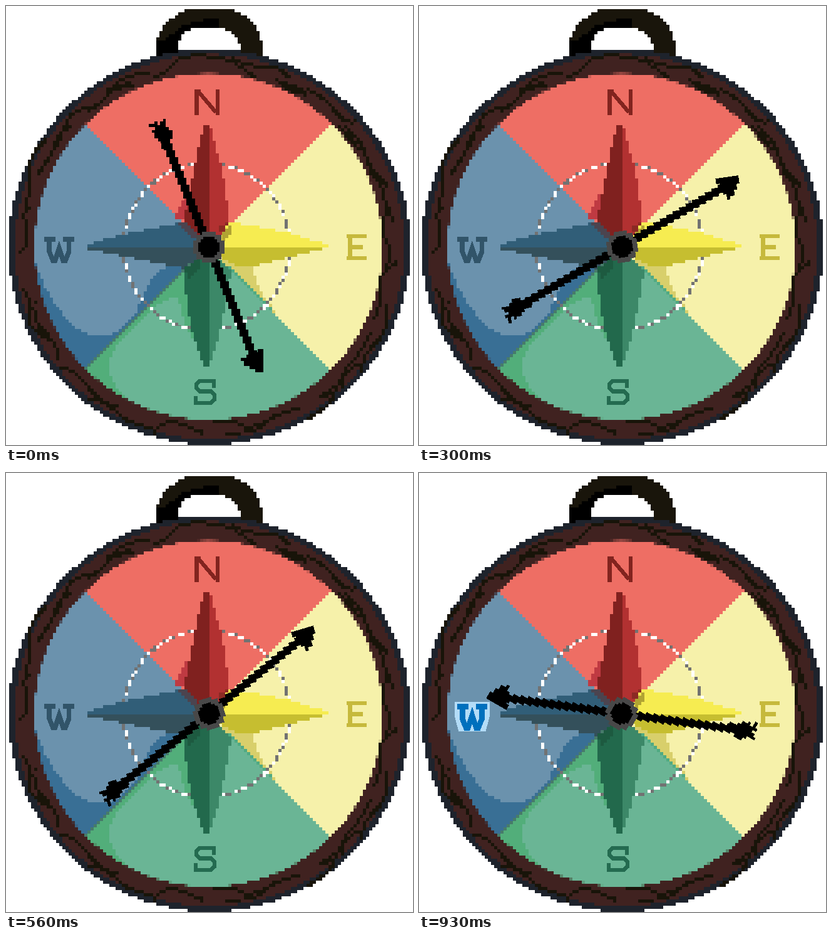
An HTML page without scripts that plays this animation: 650x700 px, repeating every 0.96 s.

```html
<!DOCTYPE html>
<html lang="en">
<head>
<meta charset="utf-8">
<title>Compass</title>
<style>
  html, body { margin: 0; width: 100%; height: 100%; overflow: hidden; background: #fff; }
  svg { display: block; width: 650px; height: 700px; shape-rendering: crispEdges; }

  @property --tick { syntax: "<number>"; inherits: false; initial-value: 0; }

  /* Quadratic ease-in-out over 21 ticks, one and two thirds turns */
  .needle {
    --u: calc(var(--tick) / 21);
    --a: min(var(--u), .5);
    --b: max(0, var(--u) - .5);
    --ease: calc(2 * var(--a) * var(--a) + 2 * var(--b) - 2 * var(--b) * var(--b));
    transform-origin: 324px 384px;
    transform: rotate(calc(-600deg * var(--ease)));
    animation: spin 960ms infinite;
  }
  @keyframes spin {
    0% { --tick: 0; }
    9.6875% { --tick: 0; animation-timing-function: steps(21); }
    82.604%, 100% { --tick: 21; }
  }

  .lit { visibility: hidden; animation: light 960ms step-end infinite; }
  @keyframes light { 0% { visibility: hidden; } 96.77%, 100% { visibility: visible; } }

  .letters { fill: none; stroke-width: 1.4; }
  .grain { fill: none; stroke: #181409; stroke-width: 4.8; }
</style>
</head>
<body>
<svg viewBox="0 0 650 700" role="img" aria-label="Compass: N E S W">
  <defs>
    <!-- One sample per 5 px cell, grown to fill the cell -->
    <filter id="pixels" filterUnits="userSpaceOnUse" x="0" y="0" width="650" height="700" color-interpolation-filters="sRGB">
      <feFlood x="2" y="2" width="1" height="1" flood-color="#000"/>
      <feOffset x="0" y="0" width="5" height="5"/>
      <feTile result="dots"/>
      <feComposite in="SourceGraphic" in2="dots" operator="in"/>
      <feMorphology operator="dilate" radius="2"/>
    </filter>
    <clipPath id="dial"><ellipse cx="323.5" cy="383.5" rx="278" ry="276"/></clipPath>
    <clipPath id="west"><path d="M321 384L0 63V705z"/></clipPath>
    <clipPath id="south"><path d="M321 384L0 705H642z"/></clipPath>

    <!-- Staircase shaft built by doubling one step -->
    <path id="s1" d="M-6.800-5.500h13.600v11h-13.600z"/>
    <g id="s2"><use href="#s1"/><use href="#s1" x="4.5" y="11"/></g>
    <g id="s4"><use href="#s2"/><use href="#s2" x="9" y="22"/></g>
    <g id="s8"><use href="#s4"/><use href="#s4" x="18" y="44"/></g>
    <g id="s16"><use href="#s8"/><use href="#s8" x="36" y="88"/></g>

    <path id="w" d="M0 .7h3.9M6.6 .7h3.9M1.8 0v5l1.3 3.2h.7l1.45-4.4 1.45 4.4h.7l1.3-3.2v-5"/>
  </defs>

  <g filter="url(#pixels)">
    <!-- Loop -->
    <path fill="#19150b" d="M241 80V52Q252 22 288 6H362Q400 20 408 55L412 85H377V72Q370 34 322 33Q284 34 277 54V80z"/>
    <path fill="#000" d="M241 80V58Q262 50 275 36Q300 20 340 22V34Q284 30 277 54V80z"/>

    <!-- Wooden rim -->
    <ellipse cx="325" cy="384" rx="321" ry="315.500" fill="#1e232c"/>
    <ellipse cx="325" cy="384" rx="311" ry="307" fill="#402220"/>
    <g class="grain">
      <path d="M236 112Q255 108 268 92T320 80T368 92T402 116"/>
      <path d="M362 82Q382 96 410 96T452 114"/>
      <path d="M130 168Q158 152 170 130T232 108"/>
      <path d="M80 226Q92 196 100 180T140 160"/>
      <path d="M50 268Q74 240 82 208L104 190"/>
      <path d="M28 322Q42 300 38 268T64 214"/>
      <path d="M22 392Q40 380 32 350T40 322"/>
      <path d="M24 448Q40 460 36 486T62 530"/>
      <path d="M46 470Q40 500 62 520T84 566"/>
      <path d="M86 576Q110 580 130 606T180 640"/>
      <path d="M132 626Q160 630 180 650T236 672"/>
      <path d="M236 682Q250 656 278 666T316 682"/>
      <path d="M330 664Q358 656 376 668T432 650"/>
      <path d="M350 680Q390 684 410 668T470 640"/>
      <path d="M478 660Q520 640 526 614T564 570"/>
      <path d="M540 612Q530 592 552 568T582 520"/>
      <path d="M568 586Q566 560 590 538T606 476"/>
      <path d="M588 500Q600 470 598 446T626 408"/>
      <path d="M606 420Q620 396 606 370T616 320"/>
      <path d="M580 262Q600 280 604 304T620 342"/>
      <path d="M540 192Q566 210 574 238T612 288"/>
      <path d="M480 134Q506 142 524 166T560 184"/>
    </g>
    <path fill="#181409" d="M428 116L474 130L484 146L446 134zM160 132L198 120L204 128L170 136zM50 506L66 518L70 536L54 526zM524 182L554 208L570 238L550 218zM492 628L526 604L516 622z"/>

    <!-- Dial -->
    <g clip-path="url(#dial)">
      <path fill="#ee6e64" d="M321 384L0 63V0H642V63z"/>
      <path fill="#f6f1aa" d="M321 384L650 55V713z"/>
      <g clip-path="url(#west)">
        <path fill="#396f95" d="M0 0H330V700H0z"/>
        <path fill="#6b92ad" d="M0 0H330V390L268 412Q238 420 228 442Q216 466 208 488Q184 526 146 527Q108 522 84 482Q60 452 48 410H0z"/>
      </g>
      <g clip-path="url(#south)">
        <path fill="#52ae7a" d="M0 380H650V700H0z"/>
        <path fill="#6ab595" d="M208 638Q158 598 166 568Q170 546 192 524L235 482Q262 462 275 468L285 505L298 530H330V384H360L440 486L650 713H208z"/>
      </g>
      <path fill="#d8cf6b" d="M345 405L392 412L404 452L434 492L425 488z"/>
      <path fill="#50aa82" d="M350 413L362 420L430 488L420 482z"/>
    </g>

    <g fill="none" stroke-width="4.2">
      <circle cx="320.5" cy="384" r="133" stroke="#727272"/>
      <circle cx="320.5" cy="384" r="133" stroke="#fff" stroke-dasharray="11 9"/>
    </g>

    <!-- Star -->
    <path fill="#bf3a42" d="M291 290V342H267z"/>
    <path fill="#80211f" d="M323 192H316L305 235L295 290L284 340L305 366L323 384z"/>
    <path fill="#b23131" d="M323 192H326L345 260L358 346L323 384z"/>
    <path fill="#f6ec51" d="M513 380L455 363L400 352L358 345L323 386H513z"/>
    <path fill="#c6be30" d="M513 386L455 400L380 418L345 403L323 386z"/>
    <path fill="#22694c" d="M323 577H317L300 530L290 480L283 423L323 384z"/>
    <path fill="#3c8868" d="M323 577L340 530L350 480L360 423L323 384z"/>
    <path fill="#315e78" d="M130 380L190 363L272 347L323 387H130z"/>
    <path fill="#34505b" d="M130 387L190 400L285 418L323 387z"/>
    <path fill="#4b444f" d="M272 346L286 344L306 364L300 372z"/>
    <path fill="#8b2a24" d="M340 350L358 345L344 364z"/>
    <path fill="#b1a433" d="M346 362L360 347V360L348 376z"/>
    <path fill="#1d5a40" d="M284 420L308 400L312 414L292 434z"/>
  </g>

  <g class="letters">
    <path transform="translate(301 133) scale(4.55)" stroke="#82241f" d="M.8 0v9M8.1 0v9M0 .7h2.2M1.4 .8L7.5 8"/>
    <path transform="translate(544 364) scale(4.55)" stroke="#c6b93c" d="M0 .6h7.1M1.2 0v9M0 8.4h7.1M1.2 4.5h4.6"/>
    <path transform="translate(300 595) scale(4.55)" stroke="#246b50" d="M7.1 3V0M6.6 .7H2L.9 1.8V3.2L2 4.3H6L7.2 5.4V7.2L6 8.3H.7M.7 9V6"/>
    <g transform="translate(61 369) scale(4.55)" stroke-width="1.7">
      <use href="#w" stroke="#315469"/>
      <g class="lit">
        <path d="M-.9-.9h12.3v5L10 9.5H.5L-.9 4.1z" fill="#b3dcf7"/>
        <use href="#w" stroke="#0070bd" stroke-width="1.9"/>
      </g>
    </g>
  </g>

  <g class="needle">
    <use href="#s16" x="254.250" y="213.500"/>
    <use href="#s16" x="326.250" y="389.500"/>
    <path fill="#484848" d="M313 360h22v5h9v9h5v21h-5v9h-9v5h-22v-5h-9v-9h-5v-21h5v-9h9z"/>
    <path d="M315 368h18v4h4v5h4v15h-4v5h-4v4h-18v-4h-4v-5h-4v-15h4v-5h4z"/>
    <path d="M375 561h9v-5h9v-4h9v-5h9v37h-13v-5h-9v-5h-9v-8h-5z"/>
    <path d="M228 188h9v-4h5v6h4v-6h5v-4h4v13h5v5h6v14h-4v8h-5v8h-9v-12h-5v-5h-6v-9h-4v-4h5v-5h-10z"/>
  </g>
</svg>
</body>
</html>
```
